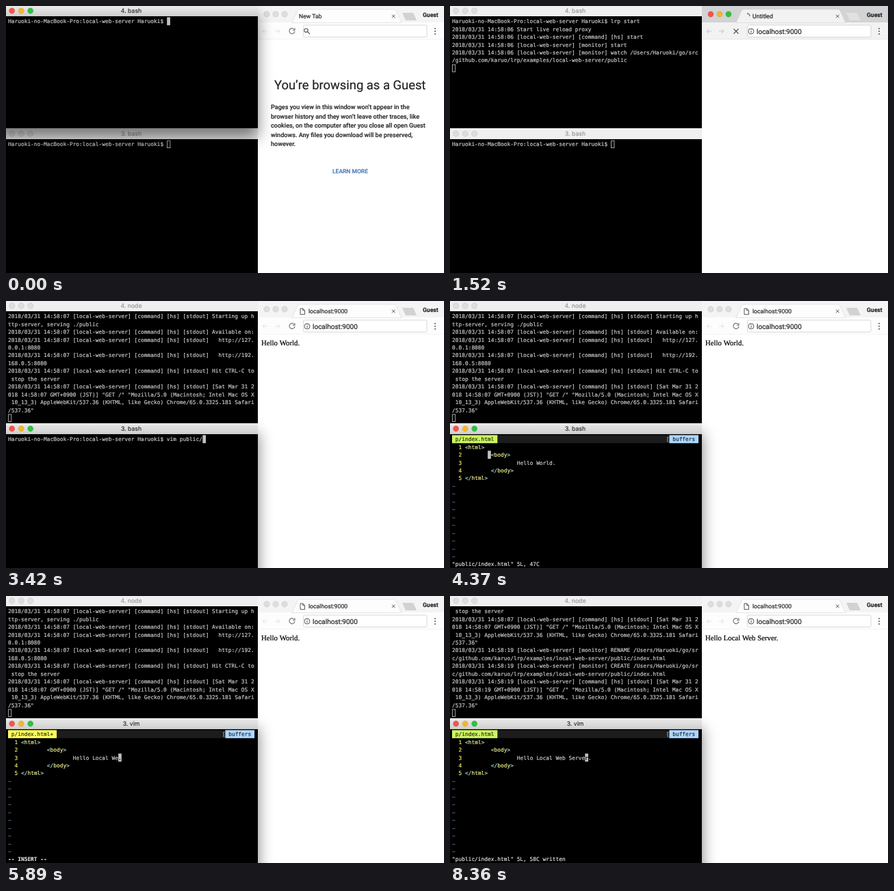
An HTML page that plays this animation: 640x391 px, repeating every 8.55 s.

```html
<!DOCTYPE html>
<html lang="en">
<head>
<meta charset="utf-8">
<title>Live reload proxy</title>
<style>
html, body { margin: 0; width: 100%; height: 100%; overflow: hidden; background: #fff; }
svg { display: block; width: 640px; height: 391px; }
text { font-family: Roboto, sans-serif; text-rendering: geometricPrecision; stroke-width: .2; }
.mono { font-family: "DejaVu Sans Mono", monospace; font-size: 7.87px; }
.title { font-family: Inter, sans-serif; font-size: 8.7px; text-anchor: middle; }
.serif { font-family: "Liberation Serif", serif; font-size: 10.8px; }
</style>
</head>
<body>
<svg id="stage" viewBox="0 0 640 391"></svg>
<script>
const STEP = 190, STEPS = 45;
const COLS = 76, ROWS = 14, CW = 4.738, RH = 11.45;
const TOP = -1, BOTTOM = 179, WIDTH = 368;
const USER = 'Haruoki';
const PROMPT = `${USER}-no-MacBook-Pro:local-web-server ${USER}$ `;
const DIR = `/Users/${USER}/go/src/github.com/karuo/lrp/examples/local-web-server/public`;
const TEXT = '#cacaca';

// Steps at which something happens
const AT = { run: 7, browser: 8, served: 10, shell: 14, path: 19, vim: 22, line: 24, word: 26,
  insert: 27, command: 36, saved: 37, reload: 40 };

const log = (sec, msg) => `2018/03/31 14:58:${sec} ${msg}`;
const site = (sec, msg) => log(sec, `[local-web-server] ${msg}`);
const out = (sec, msg) => site(sec, `[command] [hs] [stdout] ${msg}`);
const request = sec => out(sec, `[Sat Mar 31 2018 14:58:${sec} GMT+0900 (JST)] "GET /" "Mozilla/5.0 ` +
  '(Macintosh; Intel Mac OS X 10_13_3) AppleWebKit/537.36 (KHTML, like Gecko) Chrome/65.0.3325.181 Safari/537.36"');

const LOGS = [
  [AT.run, log('06', 'Start live reload proxy'), site('06', '[command] [hs] start'),
    site('06', '[monitor] start'), site('06', `[monitor] watch ${DIR}`)],
  [AT.served, out('07', 'Starting up http-server, serving ./public'), out('07', 'Available on:'),
    out('07', '  http://127.0.0.1:8080'), out('07', '  http://192.168.0.5:8080'),
    out('07', 'Hit CTRL-C to stop the server'), request('07')],
  [AT.saved, site('19', `[monitor] RENAME ${DIR}/index.html`), site('19', `[monitor] CREATE ${DIR}/index.html`)],
  [AT.reload, request('19')],
];

const esc = s => s.replace(/&/g, '&amp;').replace(/</g, '&lt;').replace(/ /g, '\u00a0');
const rect = (x, y, w, h, fill, more = '') =>
  `<rect x="${x}" y="${y}" width="${w}" height="${h}" fill="${fill}" ${more}/>`;
const text = (x, y, s, fill, more = '') =>
  `<text x="${x}" y="${y}" fill="${fill}" stroke="${fill}" ${more}>${esc(s)}</text>`;
const path = (d, stroke, more = '') => `<path d="${d}" fill="none" stroke="${stroke}" ${more}/>`;
const sized = (px, weight = 400) => `font-size="${px}" font-weight="${weight}"`;

function lights(x, y, gap, active) {
  const colors = active ? ['#f4554d', '#f5b62e', '#2fc043'] : Array(3).fill('#dedede');
  return colors.map((c, i) =>
    `<circle cx="${x + i * gap}" cy="${y}" r="4.2" fill="${c}" stroke="#0002" stroke-width=".6"/>`).join('');
}

// Text on the character grid of a terminal whose title bar starts at y
function cell(y, row, col, s, fill = TEXT, bg = '', bold = false) {
  const x = 3 + col * CW, mid = y + 23.4 + row * RH;
  return (bg && rect(x, mid - 6, s.length * CW, 11.8, bg)) +
    text(x, mid + 2.8, s, fill, `class="mono" font-weight="${bold ? 700 : 400}"`);
}

function cursor(y, row, col, active, under = ' ') {
  if (active) return cell(y, row, col, under, '#000', '#c0c0c0');
  return rect(3.4 + col * CW, y + 18.2 + row * RH, CW - .4, RH - 1, 'none', 'stroke="#b8b8b8" stroke-width=".9"');
}

function terminal(y, h, title, active, body) {
  return rect(0, y, WIDTH, h, '#000') +
    rect(0, y, WIDTH, 16, active ? 'url(#bar)' : '#efefef') +
    lights(8.7, y + 8, 13.5, active) +
    text(183, y + 11.2, title, active ? '#333' : '#999', 'class="title"') + body;
}

function topTerminal(k, active) {
  const lines = [PROMPT + 'lrp start'.slice(0, k * 2)];
  for (const [at, ...entries] of LOGS) if (k >= at) lines.push(...entries);
  if (k >= AT.run) lines.push('');
  const rows = lines.flatMap(l => l.match(/.{1,76}/g) || ['']).slice(-ROWS);
  const last = rows.length - 1;
  return terminal(TOP, 180, k < AT.served ? '4. bash' : '4. node', active,
    rows.map((s, i) => cell(TOP, i, 0, s)).join('') + cursor(TOP, last, rows[last].length, active));
}

function tag(row, col, s) {
  let x = col;
  return s.match(/\w+|\W+/g).map(part => {
    const piece = cell(BOTTOM, row, x, part, /\w/.test(part) ? '#eeee90' : '#a4dcdc');
    x += part.length;
    return piece;
  }).join('');
}

function editor(k) {
  const y = BOTTOM, inserting = k >= AT.insert && k < AT.command;
  const dirty = k >= AT.insert && k < AT.saved;
  const word = k < AT.insert ? 'World' : 'Local Web Server'.slice(0, (k - AT.insert) * 2);
  const line = `Hello ${word}.`;
  const file = '"public/index.html" 5L, ';
  const status = k < AT.insert ? file + '47C' : inserting ? '-- INSERT --' :
    k < AT.saved ? ':w' : file + '58C written';

  let s = cell(y, 0, 0, ' '.repeat(COLS), TEXT, '#1c1c1c') +
    cell(y, 0, 0, dirty ? ' p/index.html+ ' : ' p/index.html ', '#303000', dirty ? '#ffff5f' : '#cbf563') +
    cell(y, 0, 66, '[', '#8fb4d8') + cell(y, 0, 67, ' buffers ', '#203040', '#afd7ff');
  for (let i = 1; i <= 5; i++) s += cell(y, i, 2, String(i), '#f0f060');
  s += tag(1, 4, '<html>') + tag(2, 12, '<body>') + cell(y, 3, 20, line) +
    tag(4, 12, '</body>') + tag(5, 4, '</html>');
  for (let i = 6; i < 16; i++) s += cell(y, i, 0, '~', '#5c7aa0');
  s += cell(y, 16, 0, status, '#dedede', '', inserting);

  if (k < AT.line) return s + cursor(y, 2, 11, true);
  if (k === AT.command) return s + cursor(y, 16, 2, true);
  const at = k < AT.word ? (k - AT.line) * 3 : 6 + (k < AT.insert ? 0 : word.length - (inserting ? 0 : 1));
  return s + cursor(y, 3, 20 + at, true, line[at]);
}

function bottomTerminal(k, active) {
  const typed = 'vim public/index.html'.slice(0, k < AT.path ? Math.max(0, Math.floor((k - AT.shell) * 2.75)) : 21);
  const line = PROMPT + typed;
  return terminal(BOTTOM, 212, k <= AT.vim + 1 ? '3. bash' : '3. vim', active,
    k >= AT.vim ? editor(k) : cell(BOTTOM, 0, 0, line) + cursor(BOTTOM, 0, line.length, active));
}

function guestPage() {
  const lines = ['Pages you view in this window won’t appear in the',
    'browser history and they won’t leave other traces, like',
    'cookies, on the computer after you close all open Guest',
    'windows. Any files you download will be preserved,', 'however.'];
  return text(392, 122.3, 'You’re browsing as a Guest', '#222', sized(18.4)) +
    lines.map((l, i) => text(387, 151 + i * 13.5, l, '#2c2c2c', sized(9.1, 500))).join('') +
    text(477, 245.2, 'LEARN MORE', '#4a7ab8', sized(8.5, 500));
}

function browser(k, active) {
  const guest = k < AT.browser, loading = !guest && k < AT.served;
  const bar = active ? '#f2f2f2' : '#fdfdfd', ink = active ? '#555' : '#777';
  let s = rect(WIDTH, 0, 272, 391, '#fff') + rect(WIDTH, 0, 272, 24, active ? '#d2d3d5' : '#f4f4f4') +
    rect(WIDTH, 24, 272, 25, bar) + rect(WIDTH, 48.5, 272, .6, active ? '#ddd' : '#eee') +
    lights(381, 12, 13, active) +
    `<path d="M418 24.5L426 7Q427 5 429 5H567Q569 5 570 7L578 24.5z" fill="${bar}" stroke="#ccc" stroke-width=".5"/>` +
    `<path d="M579 10h16l5 11h-16z" fill="${active ? '#e2dfdf' : '#d2d2d2'}"/>` +
    path('M564 12.7l4.6 4.6m0-4.6l-4.6 4.6', '#555') +
    text(609, 15.8, 'Guest', '#111', sized(8.6, 500)) +
    path('M382 37h-7m3.2-3.2L375 37l3.2 3.2M393 37h7m-3.2-3.2L400 37l-3.2 3.2', active ? '#c4c4c4' : '#e2e2e2') +
    (loading ? path('M414.5 33.5l7 7m0-7l-7 7', ink, 'stroke-width="1.3"')
      : path('M421 34a4 4 0 1 0 1 3M422 32.5v3h-3', ink, 'stroke-width="1.2"')) +
    rect(434.5, 28, 180.5, 17.5, '#fff', 'rx="2" stroke="#cfcfcf" stroke-width=".8"') +
    [33, 37, 41].map(y => `<circle cx="627" cy="${y}" r="1" fill="#555"/>`).join('');

  if (guest) {
    return s + text(428, 18.2, 'New Tab', '#222', sized(8.6)) +
      path('M441 38l3 3M441.2 35.7a2.7 2.7 0 1 0-5.4 0a2.7 2.7 0 1 0 5.4 0', '#555', 'stroke-width="1.1"') + guestPage();
  }
  s += text(442, 18.2, loading ? 'Untitled' : 'localhost:9000', '#222', sized(8.7)) +
    path('M440 36.3v3M440 34.3v1.1', '#444') +
    '<circle cx="440" cy="37" r="4" fill="none" stroke="#444" stroke-width=".9"/>' +
    text(448, 40.6, 'localhost:9000', '#222', sized(10));
  if (loading) return s + path('M434 11a4 4 0 0 1 4 4', '#667', `stroke-width="1.3" transform="rotate(${(k - AT.browser) * 70} 434 15)"`);
  return s + path('M430 11h3.7l2.8 2.8v5.9H430zM433.7 11v2.8h2.8', '#444', 'stroke-width=".9"') +
    text(373, 64.8, k < AT.reload ? 'Hello World.' : 'Hello Local Web Server.', '#000', 'class="serif"');
}

const DEFS = `<defs>
  <linearGradient id="bar" x2="0" y2="1"><stop stop-color="#ebebeb"/><stop offset="1" stop-color="#cecece"/></linearGradient>
  <filter id="blur" x="-20%" y="-25%" width="140%" height="150%"><feGaussianBlur stdDeviation="11"/></filter>
</defs>`;
const shadow = (y, h) => rect(-20, y + 14, WIDTH + 20, h, '#000', 'opacity=".5" filter="url(#blur)"');

function scene(k) {
  const focus = k < AT.browser ? 'top' : k < AT.shell ? 'browser' : 'bottom';
  const top = topTerminal(k, focus === 'top'), bottom = bottomTerminal(k, focus === 'bottom');
  return DEFS + browser(k, focus === 'browser') +
    (focus === 'top' ? bottom + shadow(TOP, 180) + top
      : top + (focus === 'bottom' ? shadow(BOTTOM, 250) : '') + bottom);
}

const stage = document.getElementById('stage');
let shown = -1;
function tick() {
  const k = Math.floor(performance.now() / STEP) % STEPS;
  if (k !== shown) stage.innerHTML = scene(shown = k);
  requestAnimationFrame(tick);
}
tick();
</script>
</body>
</html>
```
